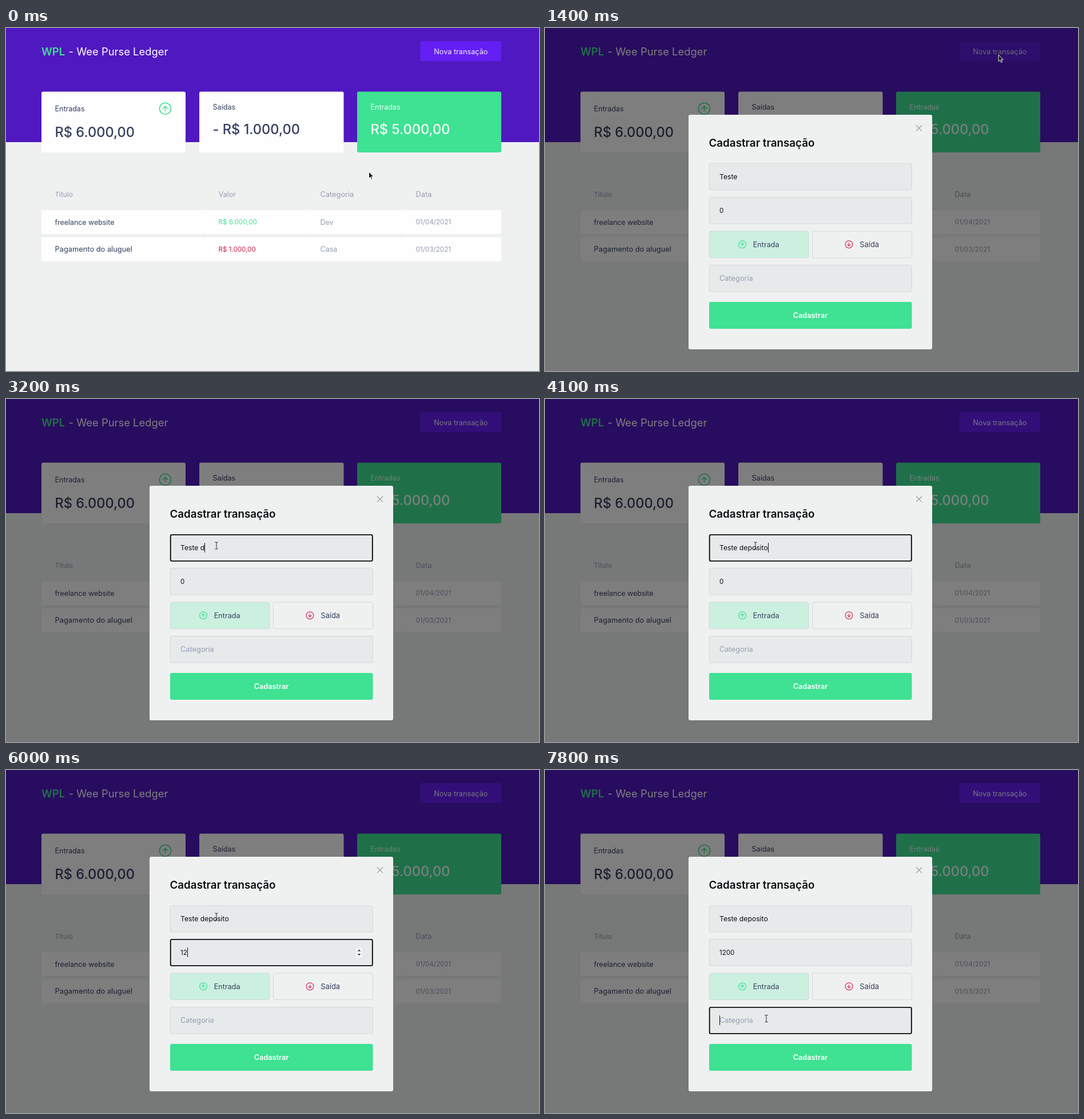
These frames come from a looping animation (932 by 601 pixels, 8000 ms). An HTML page:

```html
<!DOCTYPE html>
<html lang="pt-BR">
<head>
<meta charset="utf-8">
<title>Controle financeiro</title>
<style>
html, body { margin: 0; width: 100%; height: 100%; overflow: hidden; background: #eff1f1; }
svg { display: block; width: 932px; height: 601px; }
text { font-family: Inter, "Open Sans", sans-serif; white-space: pre; }
</style>
</head>
<body>
<svg id="stage" viewBox="0 0 932 601" xmlns="http://www.w3.org/2000/svg"></svg>
<script>
const LOOP = 8000, TICK = 100;
const GREEN = '#3fe193', INK = '#363f5f', MUTED = '#969cb3', RED = '#c5244f', PINK = '#dd2e5c';
const BG = '#eff1f1', FIELD = '#e6eaeb', LINE = '#d2d8d8', BLACK = '#0c0d10';

const rect = (x, y, w, h, fill, extra = 'rx="3"') =>
  `<rect x="${x}" y="${y}" width="${w}" height="${h}" fill="${fill}" ${extra}/>`;

// y is the middle of the capital letters
const text = (x, y, size, str, fill, weight = 400, extra = '') =>
  `<text x="${x}" y="${(y + size * 0.363).toFixed(2)}" font-size="${size}" font-weight="${weight}" fill="${fill}" ${extra}>${str}</text>`;

const arrowIcon = (x, y, r, color, turn, width) =>
  `<g transform="translate(${x} ${y}) rotate(${turn})" fill="none" stroke="${color}" stroke-width="${width}" stroke-linecap="round" stroke-linejoin="round">
    <circle r="${r}"/><path d="M0 ${r * 0.42}V${-r * 0.42}M${-r * 0.42} 0L0 ${-r * 0.42}L${r * 0.42} 0"/></g>`;

const columns = [62, 348, 526, 693, 866];
const row = (y, title, value, color, category, date) =>
  columns.slice(0, 4).map((x, i) => rect(x, y, columns[i + 1] - x, 42, '#fefefe')).join('') +
  text(85.5, y + 21, i12(title), title, INK) +
  text(371.5, y + 21, 11.6, value, color) +
  text(549.5, y + 21, 12.5, category, MUTED) +
  text(716.5, y + 21, 11.7, date, MUTED);
function i12(str) { return str.length > 18 ? 12.85 : 12.4; }

const page =
  rect(0, 0, 932, 601, BG, '') +
  rect(0, 0, 932, 200, '#5018c0', '') +
  text(62, 41, 18.5, 'WPL', GREEN, 600) +
  text(109.5, 41, 18.4, '- Wee Purse Ledger', '#fff') +
  rect(724.5, 23, 141.5, 35, '#641ff2') +
  text(795.3, 41, 12.7, 'Nova transação', '#f4f0ff', 400, 'text-anchor="middle"') +
  rect(724.5, 23, 141.5, 35, '#000', 'rx="3" id="dim" opacity="0"') +
  rect(62, 111.5, 252, 106.5, '#fefefe') +
  text(85.5, 141.5, 12.5, 'Entradas', INK) +
  arrowIcon(278.5, 141.2, 10, GREEN, 0, 1.6) +
  text(85.5, 182, 23.6, 'R$ 6.000,00', INK, 500) +
  rect(338, 111.5, 252.5, 106.5, '#fefefe') +
  text(361.5, 138.5, 12.6, 'Saídas', INK) +
  text(361.5, 177, 23.6, '- R$ 1.000,00', INK, 500) +
  rect(614, 111.5, 252, 106.5, GREEN) +
  text(637.5, 138.5, 12.5, 'Entradas', '#eafff4') +
  text(637.5, 177, 23.6, 'R$ 5.000,00', '#f4fff9', 500) +
  text(85.5, 291.5, 11.8, 'Título', MUTED) +
  text(371.5, 291.5, 12.6, 'Valor', MUTED) +
  text(549.5, 291.5, 12.8, 'Categoria', MUTED) +
  text(716.5, 291.5, 12.8, 'Data', MUTED) +
  row(319, 'freelance website', 'R$ 6.000,00', GREEN, 'Dev', '01/04/2021') +
  row(366.7, 'Pagamento do aluguel', 'R$ 1.000,00', RED, 'Casa', '01/03/2021');

const fieldTops = [237.5, 296.5, 415.5];
const box = (x, y, w, fill, id = '') =>
  rect(x, y, w, 46.5, fill, `rx="2.5" stroke="${LINE}" stroke-width="1" ${id}`);

const modal = `<g id="modal">` +
  rect(0, 0, 932, 601, '#000', 'opacity=".5"') +
  rect(251, 152, 426, 411, BG) +
  `<path d="M649.3 170.7l9.4 9.4M658.7 170.7l-9.4 9.4" stroke="#9a9fa3" stroke-width="1.3" stroke-linecap="round"/>` +
  text(286.5, 201, 18.8, 'Cadastrar transação', BLACK, 600) +
  fieldTops.map(y => box(287.3, y, 354, FIELD)).join('') +
  rect(305, 310, 8, 20, '#1e90ff', 'id="pick"') +
  text(305, 260.8, 12.2, '', BLACK, 400, 'id="name"') +
  text(305, 320, 11.6, '', BLACK, 400, 'id="sum"') +
  text(305, 438.3, 12.8, 'Categoria', MUTED) +
  `<g id="spin">` + rect(612, 311, 11, 18, '#f3f4f4', '') +
  `<path d="M614.8 317.6h5.4l-2.7-3.3zM614.8 322h5.4l-2.7 3.3z" fill="#3c3f42"/></g>` +
  box(287.3, 356, 173.7, '#cbf0e0', 'id="income"') +
  arrowIcon(345, 379.2, 6.4, GREEN, 0, 1.2) +
  text(363.8, 379.2, 12.6, 'Entrada', INK) +
  box(467.5, 356, 173.8, BG) +
  arrowIcon(531.5, 379.2, 6.4, PINK, 180, 1.2) +
  text(550.3, 379.2, 12.9, 'Saída', INK) +
  rect(287, 480, 354.5, 47, GREEN) +
  text(464, 503.3, 12.7, 'Cadastrar', '#fff', 600, 'text-anchor="middle"') +
  rect(287.7, 0, 353.1, 46, 'none', `rx="2.5" stroke="${BLACK}" stroke-width="1.9" id="ring"`) +
  rect(0, 0, 1, 17, BLACK, 'id="caret"') + `</g>`;

const pointers = `<g id="cursor">
  <path id="arrow" d="M0 0V11.6L2.7 9.1L4.5 13.3L6.4 12.5L4.6 8.4H8.3Z" fill="#15161a" stroke="#fff" stroke-width=".9" stroke-linejoin="round"/>
  <path id="hand" d="M-1.4 1.1Q-1.4 0 -.3 0T.8 1.1V5Q2.6 4.2 3 5.4Q4.7 4.8 5 6Q6.8 5.6 6.8 7.3V9.4Q6.8 11.4 5.4 13.6H-1.2Q-2.2 11.4 -4.7 8.6Q-5.2 7.2 -3.7 7.2Q-2.6 7.4 -1.4 8.8Z" fill="#fff" stroke="#15161a" stroke-width="1" stroke-linejoin="round"/>
  <path id="beam" d="M-2.7 -6H-.9L0 -5.4L.9 -6H2.7M0 -5.4V5.4M-2.7 6H-.9L0 5.4L.9 6H2.7" fill="none" stroke="#24262a" stroke-width="1"/>
</g>`;

const stage = document.getElementById('stage');
stage.innerHTML = page + modal + pointers;
const el = {};
stage.querySelectorAll('[id]').forEach(n => { el[n.id] = n; });

const show = (node, on) => node.setAttribute('visibility', on ? 'inherit' : 'hidden');

// [time, x, y]
const path = [
  [0, 634.5, 252], [600, 634.5, 252], [700, 638, 247], [900, 690, 178], [1100, 774, 82],
  [1300, 795, 43.5], [1400, 793, 47], [1500, 784, 53], [1600, 730, 84], [1800, 500, 190],
  [2000, 371, 258], [2600, 371, 258], [2700, 368, 257], [6800, 368, 257], [6900, 225.5, 241],
  [7000, 112, 262], [7100, 62, 305], [7200, 120, 350], [7300, 245, 378], [7400, 330, 388],
  [7500, 372, 400], [7700, 387, 435.5], [LOOP, 387, 435.5]
];
const nameKeys = [
  [0, 5], [2900, 6], [3200, 7], [3400, 8], [3700, 9], [3800, 10], [3900, 11], [4000, 13], [4100, 14]
];
const sumKeys = [[0, '0'], [4800, '1'], [6000, '12'], [6200, '120'], [6400, '1200']];

const held = (keys, t) => keys.filter(k => k[0] <= t).pop()[1];
const ramp = (t, a, b) => Math.min(1, Math.max(0, (t - a) / (b - a)));
const between = (t, a, b) => t >= a && t < b;

function place(t) {
  const i = path.findIndex(p => p[0] > t);
  const a = path[i - 1], b = path[i], k = ramp(t, a[0], b[0]);
  return [a[1] + (b[1] - a[1]) * k, a[2] + (b[2] - a[2]) * k];
}

const inside = (x, y, l, top, w, h) => x >= l && x <= l + w && y >= top && y <= top + h;

function draw(time) {
  const t = Math.floor(time / TICK) * TICK;
  const open = t >= 1400;
  const [x, y] = place(t);

  const overNew = !open && inside(x, y, 724, 23, 142, 35);
  const overIncome = open && inside(x, y, 287, 356, 174, 47);
  const overField = open && fieldTops.some(f => inside(x, y, 287, f, 354, 47));
  const kind = overNew || overIncome ? 'hand' : overField ? 'beam' : 'arrow';
  for (const id of ['arrow', 'hand', 'beam']) show(el[id], id === kind);
  el.cursor.setAttribute('transform', `translate(${x.toFixed(1)} ${y.toFixed(1)})`);

  el.dim.setAttribute('opacity', 0.1 * (ramp(t, 1100, 1300) - ramp(t, 1400, 1600)));
  show(el.modal, open);
  el.income.setAttribute('stroke', overIncome ? '#a9b2b0' : LINE);

  el.name.textContent = 'Teste deposito'.slice(0, held(nameKeys, t));
  el.sum.textContent = held(sumKeys, t);
  const picked = between(t, 4300, 4800);
  show(el.pick, picked);
  el.sum.setAttribute('fill', picked ? '#fff' : BLACK);

  const focus = t >= 7800 ? 2 : t >= 4300 ? 1 : t >= 2200 ? 0 : -1;
  show(el.ring, focus >= 0);
  show(el.spin, focus === 1);
  const blinkOff = t < 2300 || picked || between(t, 5400, 6000) || between(t, 7000, 7500);
  show(el.caret, focus >= 0 && !blinkOff);
  if (focus >= 0) {
    const top = fieldTops[focus];
    const typed = [el.name, el.sum][focus];
    el.ring.setAttribute('y', top + 0.4);
    el.caret.setAttribute('x', Math.round(305 + (typed ? typed.getComputedTextLength() : 0)));
    el.caret.setAttribute('y', Math.round(top + 14));
  }
}

function loop(now) {
  draw(now % LOOP);
  requestAnimationFrame(loop);
}
draw(0);
requestAnimationFrame(loop);
</script>
</body>
</html>
```
